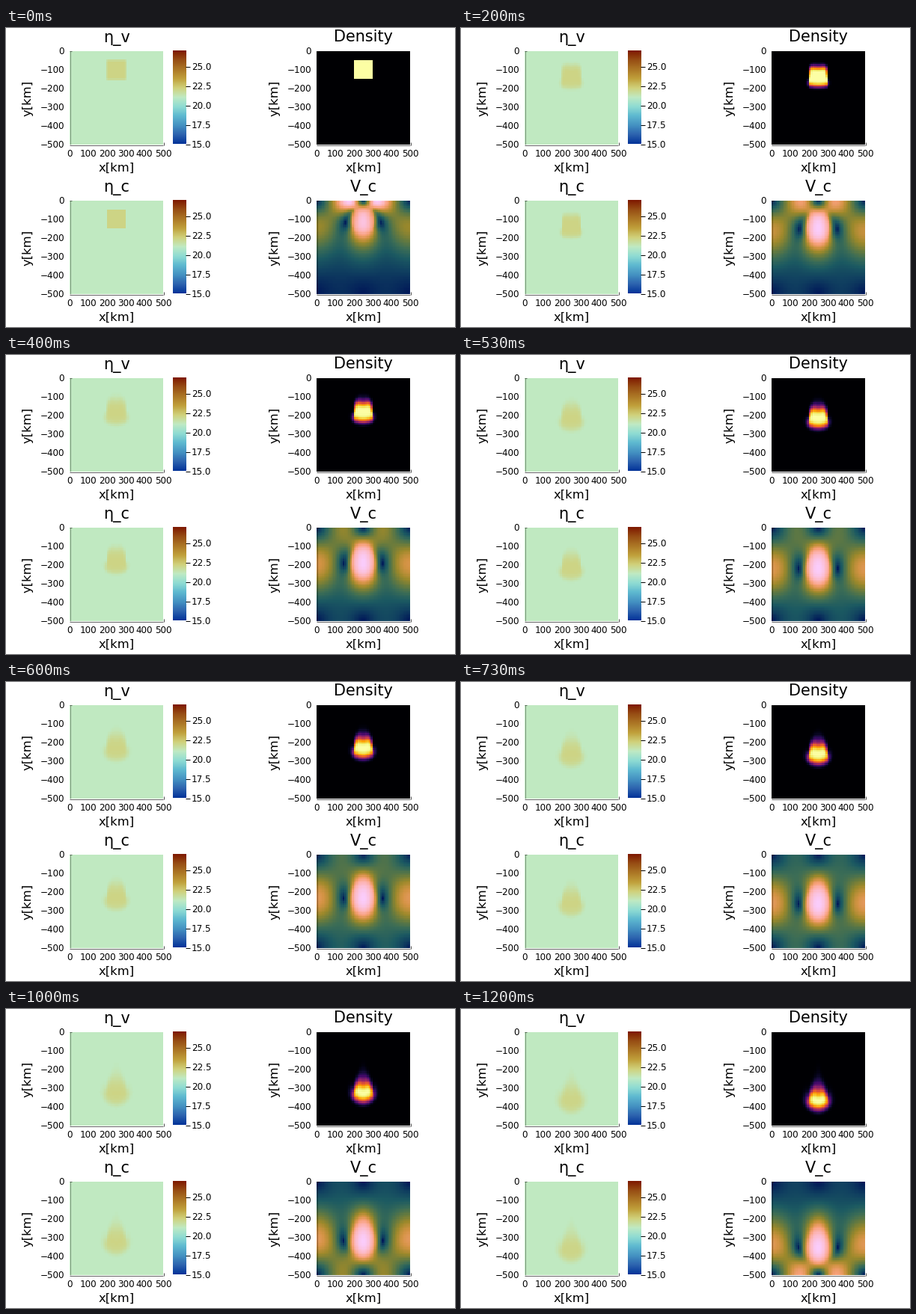
Write a matplotlib script that moves like this. It is 600 by 400 pixels and loops after 1270 ms.

```python
import numpy as np
import matplotlib.pyplot as plt
from matplotlib.animation import FuncAnimation
from matplotlib.colors import LinearSegmentedColormap
from matplotlib.patches import Rectangle

W, H, DPI = 600, 400, 100
N = 50             # cells per side, 10 km each
SIDE = 125         # panel side in pixels
POSES = 19
SUBSTEPS = 2       # time steps per pose
TICKS = 127        # 10 ms each

ROMA = ("#023198 #2D64AF #4492C2 #5EB9D0 #8FDCD3 #C0EAC3 "
        "#D0D07A #C0A03B #AC7625 #974E14 #7E1700").split()
BATLOW = ("#011959 #103F60 #1C5A62 #3C6D56 #687B3E "
          "#9D892B #D29343 #F8A17B #FDB7BC #FACCFA").split()
roma = LinearSegmentedColormap.from_list("roma_rev", ROMA, N=256)
batlow = LinearSegmentedColormap.from_list("batlow_like", BATLOW, N=256)

# Sine basis and second difference for the free-slip box
k = np.arange(1, N)
SINE = np.sin(np.pi * np.outer(k, k) / N)
LAM = 4 * np.sin(np.pi * k / (2 * N)) ** 2
BIHARM = (LAM[:, None] + LAM[None, :]) ** 2
LAP = np.eye(N - 1, k=1) + np.eye(N - 1, k=-1) - 2 * np.eye(N - 1)


def cross_diff(a):
    return np.diff(np.diff(a, axis=0), axis=1)


def to_vertices(c):
    p = np.pad(c, 1, mode="edge")
    return (p[1:, 1:] + p[1:, :-1] + p[:-1, 1:] + p[:-1, :-1]) / 4


def viscosity(rho):
    return 1 + 9 * rho


def precondition(r):
    return SINE @ ((SINE @ r @ SINE) / BIHARM) @ SINE * (2 / N) ** 2


def solve_stokes(rho, psi):
    """Stream function of the sinking block, by conjugate gradients."""
    eta_c = viscosity(rho)
    eta_v = to_vertices(eta_c)[1:-1, 1:-1]

    def apply(p):
        stretch = 4 * cross_diff(eta_c * cross_diff(np.pad(p, 1)))
        shear = eta_v * (p @ LAP - LAP @ p)
        return stretch + shear @ LAP - LAP @ shear

    force = np.diff((rho[1:] + rho[:-1]) / 2, axis=1)
    res = force - apply(psi)
    z = precondition(res)
    step = z.copy()
    rz = np.sum(res * z)
    first = np.sum(force * precondition(force))
    for _ in range(40):
        if rz < 1e-8 * first:
            break
        a_step = apply(step)
        alpha = rz / np.sum(step * a_step)
        psi = psi + alpha * step
        res = res - alpha * a_step
        z = precondition(res)
        rz, old = np.sum(res * z), rz
        step = z + (rz / old) * step
    return psi


def velocity(psi):
    full = np.pad(psi, 1)
    return np.diff(full, axis=0), -np.diff(full, axis=1)


def advect(rho, u, w, dt):
    """One upwind step; its smearing is part of the look."""
    fx, fz = np.zeros_like(u), np.zeros_like(w)
    ui, wi = u[:, 1:-1], w[1:-1]
    fx[:, 1:-1] = ui * np.where(ui > 0, rho[:, :-1], rho[:, 1:])
    fz[1:-1] = wi * np.where(wi > 0, rho[:-1], rho[1:])
    rho = rho - dt * (np.diff(fx, axis=1) + np.diff(fz, axis=0))
    return np.clip(rho, 0, 1)


def speed(u, w):
    return np.hypot((u[:, 1:] + u[:, :-1]) / 2, (w[1:] + w[:-1]) / 2)


def simulate(courant):
    rho = np.zeros((N, N))
    rho[5:15, 20:30] = 1
    psi = np.zeros((N - 1, N - 1))
    dt = None
    states = []
    for _ in range((POSES - 1) * SUBSTEPS + 1):
        psi = solve_stokes(rho, psi)
        u, w = velocity(psi)
        states.append((rho, speed(u, w)))
        dt = dt or courant / np.abs(w).max()
        rho = advect(rho, u, w, dt)
    return states[::SUBSTEPS]


def core_depth(rho):
    depth = (np.arange(N) + 0.5)[:, None] * 10
    return np.sum(rho ** 2 * depth) / np.sum(rho ** 2)


def sink_to(end_depth, start=100, courant=0.5):
    """Tune the time step until the block's core ends at end_depth."""
    for _ in range(5):
        states = simulate(courant)
        reached = core_depth(states[-1][0])
        if abs(reached - end_depth) < 1:
            break
        courant *= (end_depth - start) / (reached - start)
    return states


poses = sink_to(360)

plt.rcParams["font.family"] = "DejaVu Sans"
fig = plt.figure(figsize=(W / DPI, H / DPI), dpi=DPI, facecolor="white")
ax = fig.add_axes([0, 0, 1, 1])
ax.axis("off")


def label(x, y, s, px, ha="center", **kw):
    ax.text(x, y, s, fontsize=px * 72 / DPI, ha=ha, va="baseline",
            color="black", **kw)


def line(xs, ys, alpha=1.0):
    ax.plot(xs, ys, color="black", lw=72 / DPI, alpha=alpha,
            solid_capstyle="butt", zorder=3)


def picture(data, x0, x1, y0, y1, cmap, **kw):
    return ax.imshow(data, extent=(x0, x1, y1, y0), cmap=cmap, aspect="auto",
                     interpolation="nearest", origin="upper", **kw)


def panel(x, y, title, data, cmap, **kw):
    pad = SIDE / N / 2 * (data.shape[0] - N)
    im = picture(data, x - pad, x + SIDE + pad, y - pad, y + SIDE + pad,
                 cmap, **kw)
    im.set_clip_path(Rectangle((x, y), SIDE, SIDE, transform=ax.transData))
    mid, right, bottom = x + SIDE / 2, x + SIDE, y + SIDE
    label(mid, y - 12.5, title, 20.8)
    label(mid, y + 160.4, "x[km]", 16.4)
    label(x - 51, y + SIDE / 2 + 0.5, "y[km]", 16.4, rotation=90,
          rotation_mode="anchor")
    for i in range(6):
        d = i * SIDE / 5
        label(x + d, y + 141, str(100 * i), 12)
        label(x - 6.8, y + d + 4.3, f"\u2212{100 * i}" if i else "0", 12,
              ha="right")
    line([x + 0.5] * 2, [y, bottom], 0.35)
    line([x, right], [bottom + 0.5] * 2, 0.6)
    line([right + 0.5] * 2, [bottom - 3, bottom + 1], 0.7)
    line([x, x + 3], [y - 0.5] * 2, 0.5)
    return im


def colorbar(x, y):
    picture(np.linspace(27, 15, 256)[:, None], x, x + 18, y, y + 124.5, roma)
    for i in range(5):
        ty = y + 20.5 + 26 * i
        line([x + 17.5, x + 23], [ty, ty])
        label(x + 25.6, ty + 4.3, f"{25 - 2.5 * i:.1f}", 12, ha="left")


def log_eta(rho, vertices=False):
    eta = viscosity(rho)
    return 21 + np.log10(to_vertices(eta) if vertices else eta)


rho0, speed0 = poses[0]
eta_lim = dict(vmin=15, vmax=27)
im_v = panel(85, 31, "\u03b7_v", log_eta(rho0, True), roma, **eta_lim)
im_rho = panel(415, 31, "Density", rho0, "inferno")
im_c = panel(85, 231, "\u03b7_c", log_eta(rho0), roma, **eta_lim)
im_speed = panel(415, 231, "V_c", speed0, batlow)
colorbar(222.5, 31)
colorbar(222.5, 231)
ax.set_xlim(0, W)
ax.set_ylim(H, 0)


def update(tick):
    rho, v = poses[int((tick + 0.5) * 0.15)]
    im_v.set_data(log_eta(rho, True))
    im_c.set_data(log_eta(rho))
    for im, data in ((im_rho, rho), (im_speed, v)):
        im.set_data(data)
        im.autoscale()
    return im_v, im_c, im_rho, im_speed


anim = FuncAnimation(fig, update, frames=TICKS, interval=10, repeat=True,
                     repeat_delay=0, blit=False)
plt.show()
```
